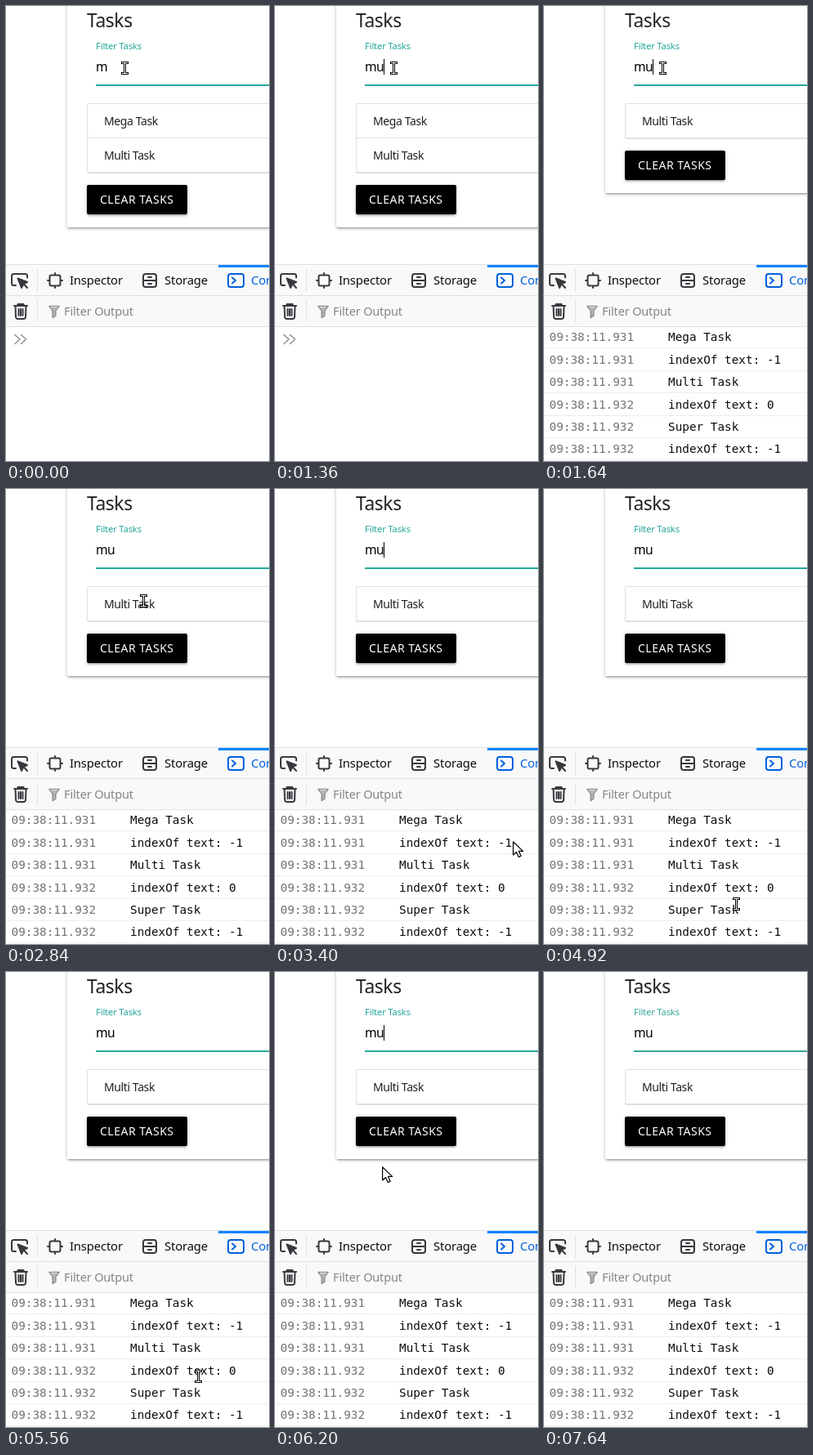
An HTML page for the animation above (7.68 s loop, 322 by 557 pixels).

```html
<!DOCTYPE html>
<html lang="en">
<head>
<meta charset="utf-8">
<title>Task filter</title>
<style>
  html, body { margin: 0; width: 100%; height: 100%; overflow: hidden; background: #fff; }
  #stage { position: relative; width: 322px; height: 557px; overflow: hidden; --accent: #26a69a; }
  #stage > * { position: absolute; box-sizing: border-box; }
  svg { left: 0; top: 0; }
  .card, .button {
    box-shadow: 0 2px 2px rgba(0,0,0,.14), 0 3px 1px -2px rgba(0,0,0,.12), 0 1px 5px rgba(0,0,0,.2);
  }
  .card { left: 75px; top: -40px; width: 400px; height: 311px; border-radius: 2px; background: #fff; }
  .list { left: 99px; top: 119px; width: 300px; height: 86px; border: 1px solid #e0e0e0; border-bottom-width: 2px; border-radius: 2px; }
  .button { left: 99px; top: 219px; width: 123px; height: 36px; border-radius: 2px; background: #000; }
  .filtered .card { height: 269px; }
  .filtered .list { height: 44px; }
  .filtered .button { top: 177px; }
  .filtered .before, #stage:not(.filtered) .after,
  .logged .prompt, #stage:not(.logged) .log { display: none; }
  .filtered .label { transform: translateY(-42px); }
  text { font-family: "Noto Sans", sans-serif; fill: #212121; white-space: pre; }
  .title { font-size: 22.8px; letter-spacing: -.4px; }
  .hint { font-size: 11.3px; letter-spacing: -.2px; }
  .query { font-size: 15.6px; font-weight: 500; letter-spacing: -.6px; }
  .item { font-size: 14px; font-weight: 500; letter-spacing: -.4px; }
  .tab { font-size: 14.8px; font-weight: 500; letter-spacing: -.15px; fill: #0c0c0d; }
  .search { font-size: 14.5px; letter-spacing: -.15px; }
  .log text { font: 14.35px "DejaVu Sans Mono", monospace; fill: #0c0c0d; }
  .log .time { fill: #737373; }
  .line { fill: none; stroke: #38383d; stroke-width: 2; stroke-linejoin: round; stroke-linecap: round; }
  .blue { stroke: #0060df; }
  .gray { stroke: #929295; stroke-width: 1.6; }
</style>
</head>
<body>
<div id="stage">
  <div class="card"></div>
  <div class="list"></div>
  <div class="button"></div>
  <svg width="322" height="557" viewBox="0 0 322 557">
    <defs>
      <path id="beamShape" d="M-2.500 -6.500H3.500M-2.500 6.500H3.500M.5 -6.500V6.500"/>
    </defs>
    <text class="title" x="99" y="26">Tasks</text>
    <text class="hint" x="110" y="53" style="fill:var(--accent)">Filter Tasks</text>
    <text class="query" id="query" x="110" y="80" style="fill:#000">m</text>
    <path id="caret" d="M0 65v19" stroke="#000" transform="translate(123.5)"/>
    <rect x="110" y="96" width="212" height="2" style="fill:var(--accent)"/>
    <g class="before">
      <path d="M100 161.5H322" stroke="#e0e0e0"/>
      <text class="item" x="120" y="146">Mega Task</text>
      <text class="item" x="120" y="188">Multi Task</text>
    </g>
    <text class="item after" x="120" y="146">Multi Task</text>
    <text class="label" x="115" y="242" font-size="14" letter-spacing=".5" style="fill:#fff">CLEAR TASKS</text>

    <!-- Developer tools -->
    <path d="M0 317H322V392H0Z" fill="#f9f9fa"/>
    <path d="M0 316.5H322M0 354.5H322M0 392.5H322M38.5 322V350M38.5 360V387" stroke="#e0e0e2"/>
    <path d="M260 317H322V320H260Z" fill="#0a84ff"/>
    <g class="line">
      <path d="M12 342H9.500Q7 342 7 339.500V330.500Q7 328 9.500 328H23.500Q26 328 26 330.500V332.500"/>
      <path d="M14.500 333.500L26 338L21.500 340L19 345Z" fill="#38383d"/>
      <path d="M21.500 340L26 345"/>
      <rect x="53.500" y="329.500" width="13" height="13" rx="2"/>
      <path d="M60 327V329M60 343V345M51 336H53M67 336H69"/>
      <rect x="168" y="328" width="16" height="16" rx="3"/>
      <path d="M168 336H184M174 332H178M174 340H178"/>
      <path d="M10 367H26M14.500 367V365H21.500V367M11.500 367L12 380.500Q12.200 383 14.500 383H21.500Q23.800 383 24 380.500L24.500 367M15.500 371V379M18 371V379M20.500 371V379"/>
      <g class="blue">
        <rect x="272" y="328" width="19" height="16" rx="3"/>
        <path d="M277 332.500L281 336L277 339.500"/>
      </g>
    </g>
    <path class="line gray" d="M53 367.500H65L60.800 373V379L57.200 381.500V373Z"/>
    <path d="M55 369H63L60 373V378.500L58 380V373Z" fill="#b5b5b8"/>
    <text class="tab" x="78" y="341">Inspector</text>
    <text class="tab" x="194" y="341">Storage</text>
    <text class="tab" x="300" y="341" style="fill:#0060df">Console</text>
    <text class="search" x="71" y="379" style="fill:#858587">Filter Output</text>
    <path class="line gray prompt" d="M11 402.500L17 408L11 413.500M18.500 402.500L24.500 408L18.500 413.500"/>
    <g class="log" id="log"></g>

    <path id="arrow" d="M.6 .8V17L4.500 13.500L7.300 19.600L10.200 18.300L7.500 12.400H12.600Z" fill="#fff" stroke="#000" stroke-width="1.200" stroke-linejoin="round"/>
    <g id="beam" stroke-linecap="square">
      <use href="#beamShape" stroke="#000" stroke-width="3"/>
      <use href="#beamShape" stroke="#fff"/>
    </g>
  </svg>
</div>
<script>
const LOOP = 7680, TICK = 40;
const $ = id => document.getElementById(id);
const stage = $('stage');

const messages = ['Mega Task', 'indexOf text: -1', 'Multi Task', 'indexOf text: 0', 'Super Task', 'indexOf text: -1'];
$('log').innerHTML = messages.map((message, i) => {
  const y = Math.ceil(410 + 27.4 * i);
  return `<text class="time" x="6.500" y="${y}">09:38:11.93${i < 3 ? 1 : 2}</text>
    <text x="152" y="${y}">${message}</text>
    <path d="M0 ${y + 8.5}H322" stroke="#ededf0"/>`;
}).join('');

// Pointer hot spot: time, x, y
const route = [
  [0, 145, 76], [2760, 145, 76], [3000, 215, 258], [3200, 291, 431],
  [3720, 291, 431], [3960, 212, 429], [4160, 139, 426], [4400, 139, 426],
  [4440, 142, 425], [4800, 205, 484], [5080, 275, 541], [5200, 271, 538],
  [5360, 271, 538], [5560, 235, 495], [5800, 215, 466], [6000, 180, 404],
  [6160, 137, 299], [6200, 131, 238], [6400, 131, 238], [6520, 88, 216],
  [6600, 62, 130], [6720, 66, -30], [LOOP, 66, -30]
];

function pointerAt(t) {
  const i = route.findIndex(stop => stop[0] > t);
  const [t0, x0, y0] = route[i - 1], [t1, x1, y1] = route[i];
  const k = (t - t0) / (t1 - t0);
  return [Math.round(x0 + (x1 - x0) * k), Math.round(y0 + (y1 - y0) * k)];
}

function overText(x, y) {
  const inside = (l, t, r, b) => x >= l && x < r && y >= t && y < b;
  return inside(110, 60, 322, 98) || inside(120, 131, 186, 152) || inside(149, 393, 291, 557);
}

function mix(from, to, k) {
  return `rgb(${from.map((c, i) => Math.round(c + (to[i] - c) * k))})`;
}

function draw() {
  const t = Math.floor(performance.now() % LOOP / TICK) * TICK;
  const typed = t >= 1360;
  stage.classList.toggle('filtered', t >= 1400);
  stage.classList.toggle('logged', t >= 1440);
  $('query').textContent = typed ? 'mu' : 'm';

  const caretOn = t >= 1000 && Math.floor((t - 1000) / 1200) % 2 === 0;
  $('caret').style.display = caretOn ? '' : 'none';
  $('caret').setAttribute('transform', `translate(${typed ? 133.5 : 123.5})`);

  const blur = t < 7600 ? 0 : t < 7640 ? .06 : .17;
  stage.style.setProperty('--accent', mix([38, 166, 154], [158, 158, 158], blur));

  const [x, y] = pointerAt(t), text = overText(x, y);
  for (const [id, shown] of [['arrow', !text], ['beam', text]]) {
    $(id).style.display = shown ? '' : 'none';
    $(id).setAttribute('transform', `translate(${x} ${y})`);
  }
  requestAnimationFrame(draw);
}
draw();
</script>
</body>
</html>
```
